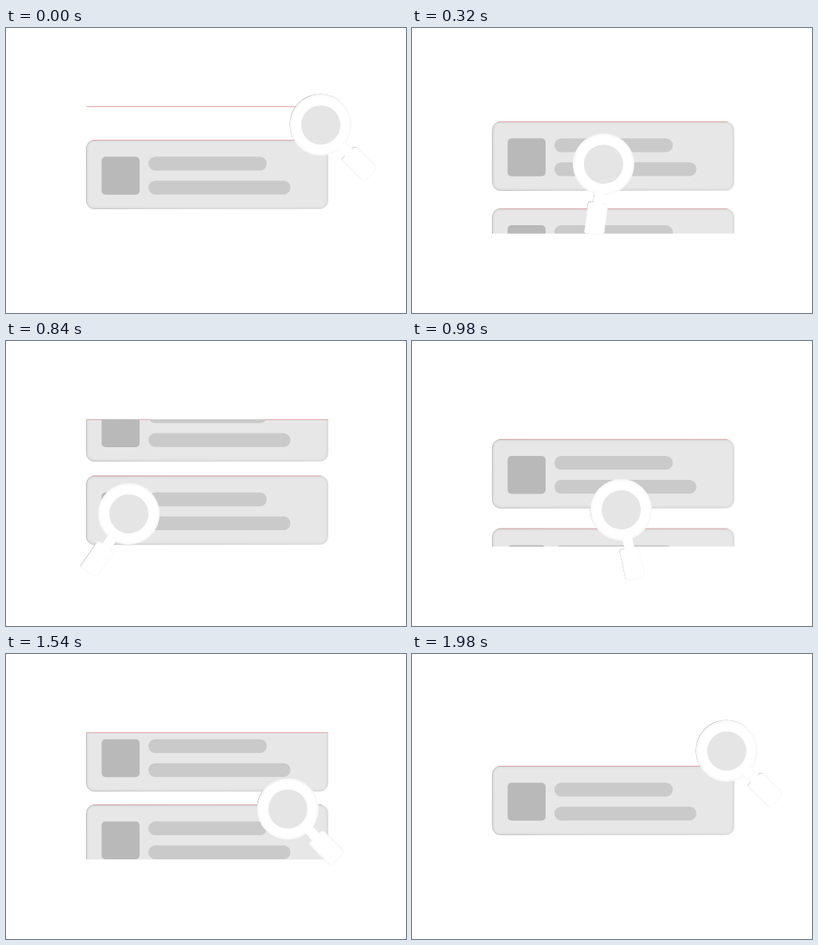
An HTML page with a canvas that plays this animation: 500 by 357 pixels, repeating every 2080 ms.

```html
<!DOCTYPE html>
<html lang="en">
<head>
<meta charset="utf-8">
<title>Searching</title>
<style>
  html, body { margin: 0; width: 100%; height: 100%; overflow: hidden; background: #fff; }
  canvas { display: block; width: 500px; height: 357px; }
</style>
</head>
<body>
<canvas id="stage" width="500" height="357"></canvas>
<script>
const ctx = document.getElementById('stage').getContext('2d');
const LOOP = 2080, TICK = 20, LAST = 1980;
const VIEW = { top: 98, bottom: 257.5 };
const CARD = { x: 100.5, y: 140.5, w: 302, h: 86, r: 10 };

// Resting places of the magnifier; each move lifts its path a little.
const A = { x: 393.5, y: 121.5, angle: 45 };
const B = { x: 124.5, y: 221, angle: 137 };
const C = { x: 338.3, y: 219, angle: 45 };
const MOVES = [
  { at: 0, from: A, to: B, lift: 8 },
  { at: 643, from: B, to: C, lift: 9 },
  { at: 1296, from: C, to: A, lift: 0 }
];
const CROSSES = [{ at: 335, x: 58.5, y: 225 }, { at: 976, x: 421, y: 251 }];

const clamp = v => Math.max(0, Math.min(1, v));
const mix = (a, b, p) => a + (b - a) * p;
const smooth = v => { v = clamp(v); return v * v * (3 - 2 * v); };

// cubic-bezier(.613, 0, .28, 1)
function glide(x) {
  x = clamp(x);
  let lo = 0, hi = 1;
  for (let i = 0; i < 24; i++) {
    const s = (lo + hi) / 2, q = 1 - s;
    if (3 * q * q * s * .613 + 3 * q * s * s * .28 + s ** 3 < x) lo = s; else hi = s;
  }
  return smooth(lo);
}

function box(x, y, w, h, r) {
  const p = new Path2D();
  p.roundRect(x, y, w, h, r);
  return p;
}

function fill(path, color) {
  ctx.fillStyle = color;
  ctx.fill(path);
}

// Soft shade just inside an outline.
function shadeInside(path, color, width) {
  ctx.save();
  ctx.clip(path);
  ctx.strokeStyle = color;
  for (let w = width; w > 0; w -= 2) {
    ctx.lineWidth = w;
    ctx.stroke(path);
  }
  ctx.restore();
}

function drawCard(y) {
  if (y > VIEW.bottom || y + CARD.h < VIEW.top) return;
  const { x, w, h, r } = CARD;
  ctx.save();
  ctx.beginPath();
  ctx.rect(0, VIEW.top, 500, VIEW.bottom - VIEW.top);
  ctx.clip();
  const body = box(x, y, w, h, r);
  fill(body, '#e7e7e7');
  shadeInside(body, 'rgba(0,0,0,.015)', 6);

  const edge = ctx.createLinearGradient(x, y, x + w, y + h);
  edge.addColorStop(0, '#b2b2b2');
  edge.addColorStop(.35, '#d0d0d0');
  edge.addColorStop(1, '#dedede');
  ctx.strokeStyle = edge;
  ctx.lineWidth = .8;
  ctx.stroke(body);

  const top = Math.max(y, VIEW.top + .5);
  const inset = y < VIEW.top ? 0 : r - 2;
  ctx.strokeStyle = '#dfa9a9';
  ctx.lineWidth = 1;
  ctx.beginPath();
  ctx.moveTo(x + inset, top);
  ctx.lineTo(x + w - inset, top);
  ctx.stroke();

  fill(box(119.5, y + 20.7, 47.5, 47.5, 5), '#b9b9b9');
  fill(box(178, y + 20.7, 148, 17.3, 8.6), '#cacaca');
  fill(box(178, y + 50.7, 177.5, 17.3, 8.6), '#cacaca');
  ctx.restore();
}

const ring = new Path2D();
ring.arc(0, 0, 38.5, 0, Math.PI * 2);
const lens = new Path2D();
lens.arc(0, 0, 24.5, 0, Math.PI * 2);
const neck = box(36, -6, 16, 12, 0);
const grip = box(49, -12.5, 40, 25, [5, 5, 3, 3]);

function atGlass(g, dx, dy, draw) {
  ctx.save();
  ctx.translate(g.x + dx, g.y + dy);
  ctx.rotate(g.angle * Math.PI / 180);
  draw();
  ctx.restore();
}

function silhouette(color) {
  [ring, neck, grip].forEach(part => fill(part, color));
}

function drawGlass(g) {
  atGlass(g, 0, 0, () => {
    silhouette('#fff');
    shadeInside(ring, 'rgba(0,0,0,.012)', 6);
    shadeInside(grip, 'rgba(0,0,0,.01)', 4);
    fill(neck, '#fff');
    fill(lens, '#e5e5e5');
  });
}

function drawCross(c, t) {
  const age = t - c.at;
  if (age <= 0 || age > 390) return;
  const grow = smooth(age / 95);
  const pop = 1 + .12 * Math.sin(Math.PI * clamp((age - 70) / 120));
  const size = grow * pop * (1 - smooth((age - 275) / 110));
  ctx.save();
  ctx.translate(c.x, c.y);
  ctx.rotate(.1);
  ctx.scale(size, size);
  ctx.strokeStyle = '#e33d31';
  ctx.lineWidth = 4.4;
  ctx.beginPath();
  for (const d of [-1, 1]) {
    ctx.moveTo(-6, -5.4 * d);
    ctx.lineTo(6, 5.4 * d);
  }
  ctx.stroke();
  ctx.restore();
}

function glassAt(move, age) {
  const p = glide(age / 660);
  return {
    x: mix(move.from.x, move.to.x, p),
    y: mix(move.from.y, move.to.y, p) - 4 * p * (1 - p) * move.lift,
    angle: mix(move.from.angle, move.to.angle, p)
  };
}

function render(t) {
  const move = MOVES.filter(m => t >= m.at).pop();
  const age = t - move.at;
  const glass = glassAt(move, age);
  ctx.fillStyle = '#fff';
  ctx.fillRect(0, 0, 500, 357);

  // The rim shows only where no card covers it.
  atGlass(glass, -.6, -.6, () => silhouette('#b9b9b9'));
  atGlass(glass, 0, 0, () => silhouette('#fff'));

  drawCard(CARD.y + 180 * smooth((age - 64) / 528));
  drawCard(CARD.y - 128.5 * (1 - smooth((age - 11) / 423)));
  CROSSES.forEach(c => drawCross(c, t));
  drawGlass(glass);
}

const start = performance.now();
function tick() {
  const t = (performance.now() - start) % LOOP;
  render(Math.min(LAST, Math.floor(t / TICK) * TICK));
  requestAnimationFrame(tick);
}
tick();
</script>
</body>
</html>
```
